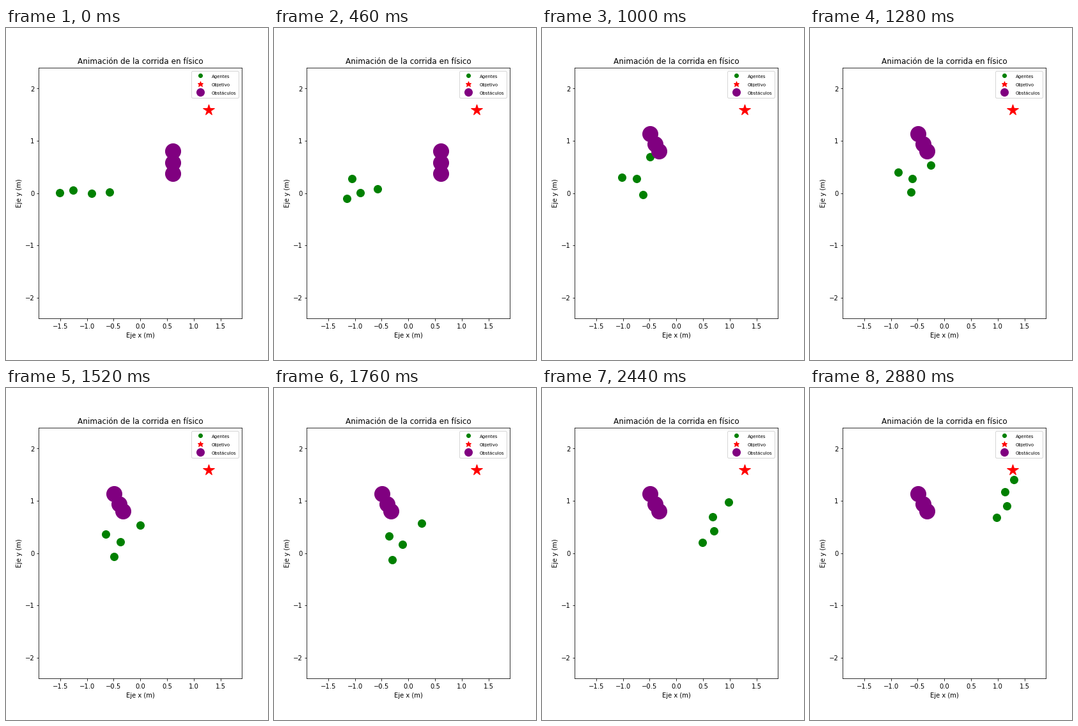
A matplotlib script that plays this animation: 410x518 px, repeating every 2.9 s.

```python
import numpy as np
import matplotlib.pyplot as plt
from matplotlib.animation import FuncAnimation

STEP, FRAMES = 20, 145

# Points are complex numbers x + yj, in metres.
GOAL = 1.28 + 1.59j
KEY_TIMES = np.array([0, 460, 760, 1280, 1760, 2440, 2880])
AGENTS = np.array([
    [-1.505+.01j, -1.15-.1j, -1.1+.155j, -.87+.4j, -.36+.325j, .68+.695j, 1.135+1.17j],
    [-1.26+.06j, -1.05+.275j, -.715+.705j, -.25+.535j, .25+.575j, .97+.98j, 1.295+1.41j],
    [-.91+0j, -.895+.005j, -.825+.215j, -.6+.275j, -.11+.165j, .705+.425j, 1.17+.9j],
    [-.575+.02j, -.575+.08j, -.585-.045j, -.625+.02j, -.3-.13j, .49+.205j, .97+.68j],
])
# The obstacles jump one after another from a column to a slanted row.
COLUMN = np.linspace(.6 + .8j, .6 + .37j, 3)
ROW = np.array([-.49 + 1.135j, -.395 + .935j, -.325 + .805j])
JUMPS = 660 + 160 * np.arange(3)


def glide(points, t):
    """Smooth cubic curve through the key points at time t."""
    i = min(np.searchsorted(KEY_TIMES, t, side="right"), len(KEY_TIMES) - 1) - 1
    h = KEY_TIMES[i + 1] - KEY_TIMES[i]
    u = (t - KEY_TIMES[i]) / h
    speed = np.gradient(points, KEY_TIMES, axis=1)
    p0, p1 = points[:, i], points[:, i + 1]
    v0, v1 = h * speed[:, i], h * speed[:, i + 1]
    ease = u * u * (3 - 2 * u)
    return p0 + (p1 - p0) * ease + u * (1 - u) * ((1 - u) * v0 - u * v1)


def place(line, points):
    line.set_data(points.real, points.imag)


plt.rcParams.update({"font.family": "DejaVu Sans", "font.size": 10,
                     "figure.subplot.bottom": .125})
fig, ax = plt.subplots(figsize=(5.7, 7.2), dpi=72)  # 410 x 518 px
ax.set(xlim=(-1.9, 1.9), ylim=(-2.4, 2.4),
       xlabel="Eje x (m)", ylabel="Eje y (m)")
ax.set_title("Animación de la corrida en físico", fontsize=12)

agents, = ax.plot([], [], "o", color="green", ms=12, label="Agentes")
ax.plot(GOAL.real, GOAL.imag, "*", color="red", ms=18, label="Objetivo")
obstacles, = ax.plot([], [], "o", color="purple", ms=24, label="Obstáculos")

legend = ax.legend(loc="upper right", markerscale=.5)
for text in legend.get_texts():
    text.set_fontsize(7)


def update(k):
    t = k * STEP
    place(agents, glide(AGENTS, t))
    place(obstacles, np.where(t >= JUMPS, ROW, COLUMN))
    return agents, obstacles


anim = FuncAnimation(fig, update, frames=FRAMES, interval=STEP,
                     repeat=True, repeat_delay=0)
plt.show()
```
